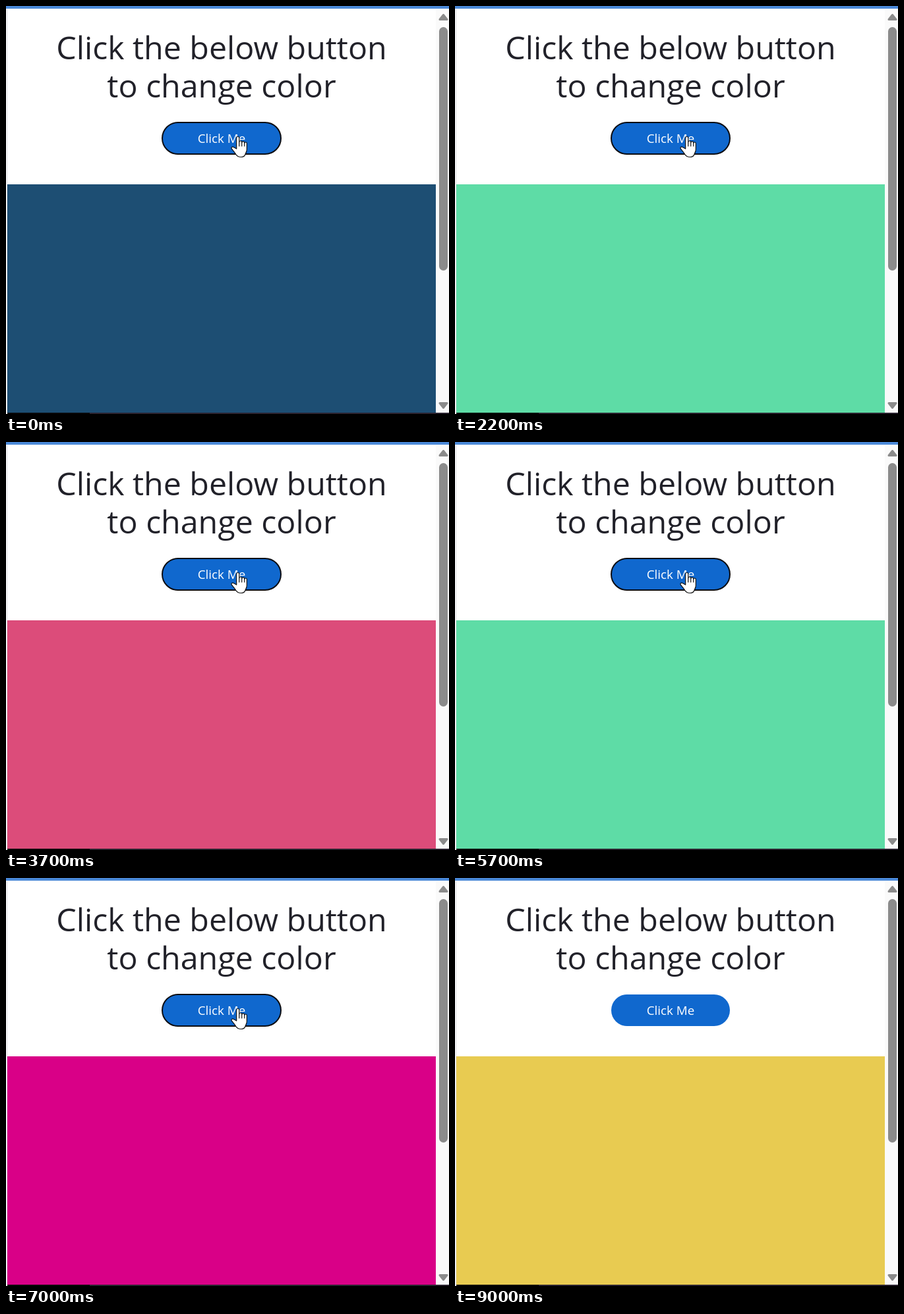
An HTML page for the animation above (9100 ms loop, 672x620 px).

```html
<!DOCTYPE html>
<html lang="en">
<head>
<meta charset="utf-8">
<title>Color changer</title>
<style>
  html, body { margin: 0; width: 100%; height: 100%; overflow: hidden; background: #fff; }
  svg { display: block; width: 672px; height: 620px; }
  text { font-family: "Open Sans", "Noto Sans", sans-serif; text-anchor: middle; }
  .heading { font-size: 48.3px; fill: #212129; }
  .label { font-size: 18.8px; fill: #fff; }
  .scroll { fill: #8b8b8b; stroke: #8b8b8b; stroke-width: 3; stroke-linejoin: round; }
</style>
</head>
<body>
<svg viewBox="0 0 672 620">
  <rect width="672" height="620" fill="#fff"/>
  <rect width="672" height="4" fill="#4b89d8"/>
  <rect y="4" width="672" height="1" fill="#e9eff8"/>
  <rect x="1" y="5" width="1" height="613" fill="#dedee2"/>

  <text class="heading" x="327" y="81">Click the below button</text>
  <text class="heading" x="327" y="138.5">to change color</text>

  <rect id="button" x="237" y="177" width="180" height="48" rx="24" fill="#1068ce" stroke-width="2"/>
  <text class="label" x="327" y="208">Click Me</text>

  <rect id="panel" x="2" y="271" width="650" height="347"/>

  <rect x="652" y="5" width="20" height="613" fill="#fafafa"/>
  <rect x="657" y="32" width="13" height="370" rx="6.5" fill="#8b8b8b"/>
  <path class="scroll" d="M663.5 13.5 L669 20.5 H658 Z"/>
  <path class="scroll" d="M663.5 610.5 L669 603.5 H658 Z"/>

  <rect y="618" width="672" height="2" fill="#2a232f"/>
  <rect x="2" y="618" width="125" height="2" fill="#08080a"/>
  <rect y="618" width="2" height="2" fill="#fff"/>

  <g id="hand" stroke="#111" stroke-width="1.2" stroke-linejoin="round" stroke-linecap="round">
    <path fill="#fff" d="M349.7 217 V200.5 a2 2 0 0 1 4 0 V207 a2 2 0 0 1 4 0
      v.8 a2 2 0 0 1 4 0 v1 a1.8 1.8 0 0 1 3.6 0 V218
      c0 4 -2 5.500 -2.500 8 c-1 2.500 -3.500 3.500 -6.500 3.500
      c-4 0 -6 -1.500 -7.500 -4 c-2 -3.500 -4 -5.500 -6.500 -8.500
      c-1.300 -2.300 1 -3.600 3 -2.500 Z"/>
    <path fill="none" d="M353.700 207 v6 M357.700 207.800 v5.200 M361.700 208.800 v4.200"/>
  </g>
</svg>
<script>
  const LOOP = 9100;
  const POINTER_LEAVES = 8700;
  const clicks = [
    [0, "#1d4e73"],
    [700, "#678aea"],
    [2100, "#5edca6"],
    [3300, "#dc4c7a"],
    [4700, "#5edca6"],
    [6300, "#d90087"],
    [7600, "#e8cb51"]
  ];
  const [button, panel, hand] = ["button", "panel", "hand"].map(id => document.getElementById(id));

  function draw(time) {
    const current = clicks.filter(([start]) => start <= time).pop();
    const focused = time < POINTER_LEAVES;
    panel.setAttribute("fill", current[1]);
    button.setAttribute("stroke", focused ? "#0c0d12" : "none");
    hand.setAttribute("visibility", focused ? "visible" : "hidden");
  }

  const origin = performance.now();
  function tick() {
    draw((performance.now() - origin) % LOOP);
    requestAnimationFrame(tick);
  }
  tick();
</script>
</body>
</html>
```
